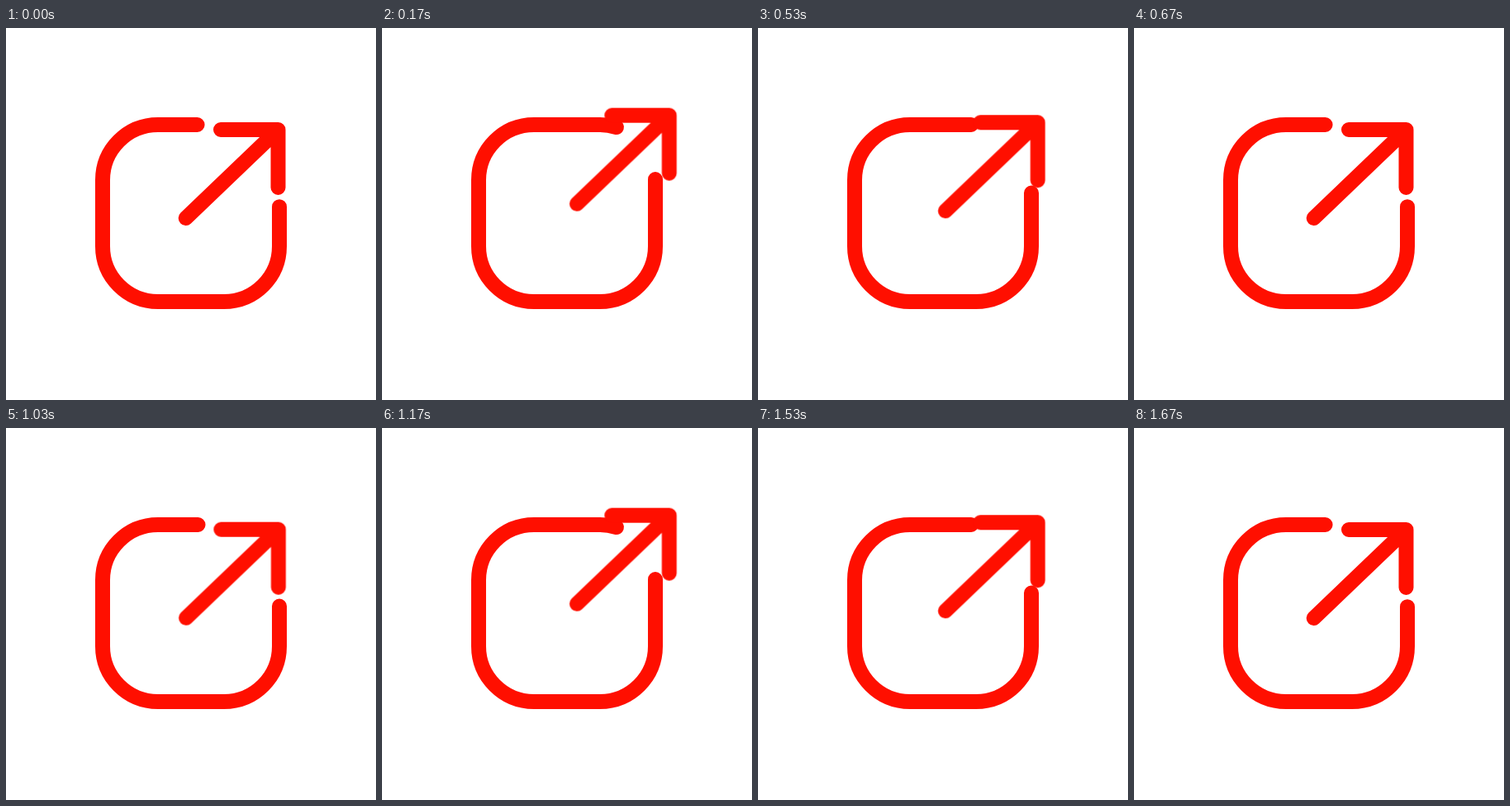
These frames come from a looping animation (448x450 px, 1.71 s). An HTML page:

```html
<!DOCTYPE html>
<html lang="en">
<head>
<meta charset="utf-8">
<title>Open arrow icon</title>
<style>
  html, body {
    margin: 0;
    width: 100%;
    height: 100%;
    overflow: hidden;
    background: #fff;
  }
  svg {
    display: block;
    width: 448px;
    height: 450px;
    fill: none;
    stroke: #ff0f00;
    stroke-width: 18px;
    stroke-linecap: round;
    stroke-linejoin: round;
  }
  /* The script steps the paused animations through --t at 30 fps. */
  .ring, .arrow {
    animation: 1s cubic-bezier(.65, 0, .35, 1) infinite paused;
    animation-delay: calc(var(--t, 0) * -1ms);
  }
  .ring { animation-name: close; }
  .arrow { animation-name: fly; }
  @keyframes close {
    0%, 66.66%, 100% { stroke-dasharray: 570.7px 2000px; stroke-dashoffset: -66px; }
    33.33% { stroke-dasharray: 742px 2000px; stroke-dashoffset: 0px; }
  }
  @keyframes fly {
    0%, 66.66%, 100% { transform: translate(0px, 0px); }
    33.33% { transform: translate(36.5px, -34.7px); }
  }
</style>
</head>
<body>
<svg viewBox="0 0 448 450">
  <path class="ring" d="M322.6 151.5A67 67 0 0 1 331 184V264A67 67 0 0 1 264 331H184A67 67 0 0 1 117 264V184A67 67 0 0 1 184 117H264A67 67 0 0 1 322.6 151.5"/>
  <path class="arrow" d="M260 123H329.5V193M217.7 230L329.5 123"/>
</svg>
<script>
  const LOOP = 1710, CYCLE = 1000;
  const root = document.documentElement;
  const start = performance.now();

  function draw(now) {
    const t = Math.max(0, now - start) % LOOP;
    const step = Math.floor((Math.floor(t / 10) * 3 + 1) / 10);
    root.style.setProperty('--t', (step * 100 / 3 % CYCLE).toFixed(2));
    requestAnimationFrame(draw);
  }
  draw(start);
</script>
</body>
</html>
```
